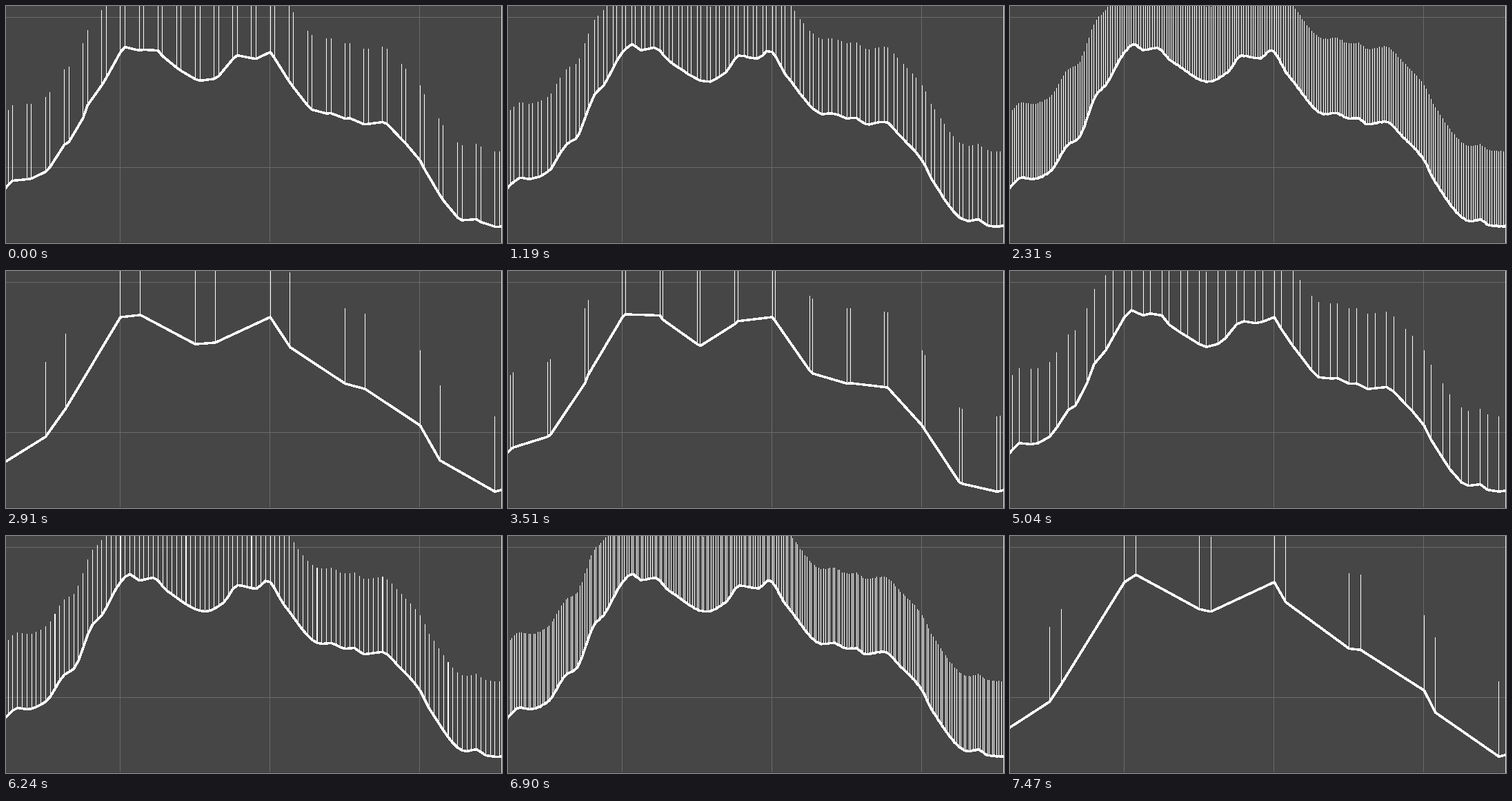
A matplotlib script that plays this animation: 719 px wide and 344 px high, repeating every 7570 ms.

```python
import numpy as np
import matplotlib.pyplot as plt
from matplotlib.animation import FuncAnimation
from matplotlib.collections import LineCollection

W, H, DPI = 719, 344, 100
PX = 72 / DPI                       # one pixel in points
UNIT, ORIGIN = 217.15, 165.45       # grid unit and a grid line, in pixels
LEVELS, LEVEL_MS, START = 5, 955, 2.485
LOOP, TICK, HOLD = 7570, 10, 7470

# Crests, hollows and ledges of the terrain
keys = np.array([
    (-44, 304), (3, 259), (16, 249), (30, 251), (57, 240), (84, 201),
    (98, 192), (125, 128), (138, 115), (165, 67), (179, 55), (193, 64),
    (213, 60), (233, 79), (289, 109), (315, 96), (335, 71), (362, 76),
    (378, 64), (403, 100), (457, 156), (470, 155), (491, 163), (504, 162),
    (518, 171), (545, 168), (569, 189), (600, 224), (613, 250), (667, 312),
    (681, 309), (695, 318), (715, 320), (728, 314), (816, 300)], float)
kx, ky = keys.T
width = np.diff(kx)
slope = np.diff(ky) / width
# Harmonic mean of the neighbouring slopes, level at every turning point
before, after = slope[:-1], slope[1:]
rising = before * after > 0
tangent = np.zeros(len(kx))
tangent[1:-1][rising] = (2 * before * after)[rising] / (before + after)[rising]


def height(x):
    k = np.clip(np.searchsorted(kx, x) - 1, 0, len(width) - 1)
    w = width[k]
    s = np.clip((x - kx[k]) / w, 0, 1)
    curve = ((1 - s) ** 2 * ((1 + 2 * s) * ky[k] + s * w * tangent[k])
             + s ** 2 * ((3 - 2 * s) * ky[k + 1] - (1 - s) * w * tangent[k + 1]))
    # Roughness that only the finest subdivision reveals
    u = (x - ORIGIN) * 32 / UNIT
    return curve + 1.2 * np.sin(np.pi * u) * np.sin(2.4 * u)


def samples(t):
    """Fixed points, each followed by the one sliding to the next midpoint."""
    p = START + t / LEVEL_MS
    level = int(p) % LEVELS
    gap = UNIT / 2 ** (level + 1)
    n = np.arange(-2 * 2 ** level, 6 * 2 ** level + 1)
    base = ORIGIN + n * gap
    x = np.column_stack([base, base + (p % 1) * gap / 2]).ravel()
    return x[(x > -60) & (x < 830)]


fig = plt.figure(figsize=(W / DPI, H / DPI), dpi=DPI, facecolor="#464646")
ax = fig.add_axes([0, 0, 1, 1])
ax.set_xlim(0, W)
ax.set_ylim(H, 0)
ax.axis("off")


def pixel_lines(segments, color, z):
    """Hairlines; snapping moves whole numbers to the pixel's centre."""
    lines = LineCollection(segments, colors=color, linewidths=PX,
                           antialiaseds=False, zorder=z)
    lines.set_snap(True)
    ax.add_collection(lines, autolim=False)
    return lines


def row(y):
    return [(0, y), (W, y)]


def column(x):
    return [(x, 0), (x, H)]


pixel_lines([row(16), row(234), column(165), column(382), column(599)],
            "#6a6a6a", 1)
pixel_lines([row(H - 1)], "#3c3c3c", 1)
pixel_lines([column(W - 1)], "#e0e0e0", 5)
stems = pixel_lines([], "white", 2)
ridge, = ax.plot([], [], color="white", lw=2.4 * PX, zorder=3,
                 antialiased=False, solid_joinstyle="round")


def update(i):
    t = min((i * TICK + 15) // 30 * 30, HOLD)
    x = samples(t)
    y = height(x)
    ridge.set_data(x + 0.5, y + 0.5)
    foot = np.column_stack([x, y])
    stems.set_segments(np.stack([foot - (0, UNIT / 2), foot], axis=1))
    return stems, ridge


anim = FuncAnimation(fig, update, frames=LOOP // TICK, interval=TICK,
                     repeat=True, repeat_delay=0)
plt.show()
```
